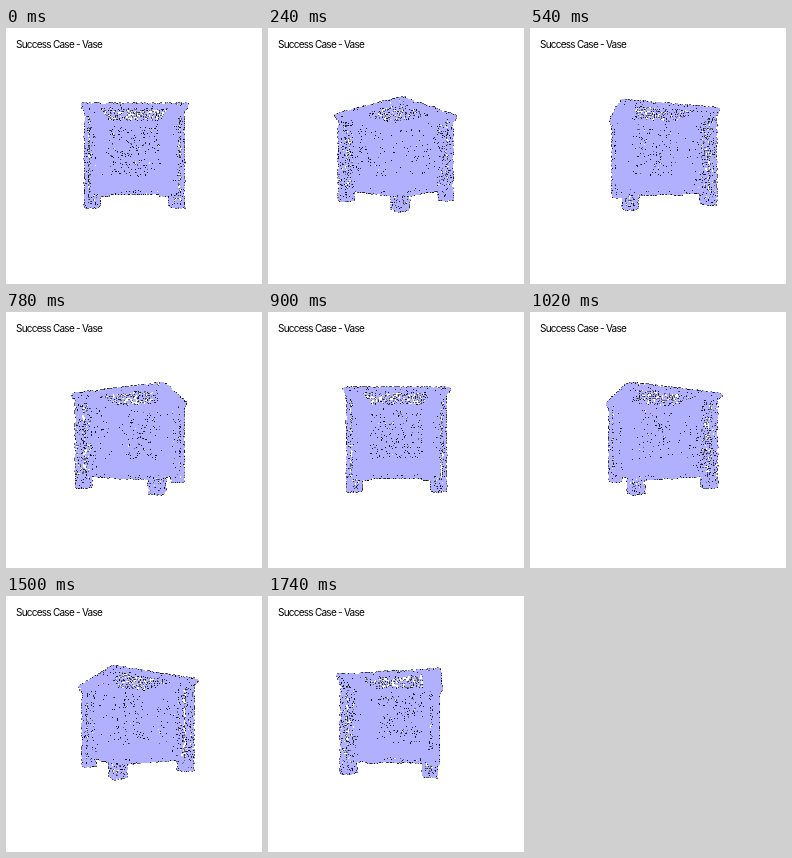
These frames come from a looping animation (256x256 px, 1800 ms). An HTML page with a canvas:

```html
<!DOCTYPE html>
<html lang="en">
<head>
<meta charset="utf-8">
<title>Rotating point cloud</title>
<style>
  html, body { margin: 0; width: 100%; height: 100%; overflow: hidden; background: #fff; }
  canvas { position: absolute; left: 0; top: 0; }
  p {
    position: absolute; left: 10px; top: 10px; margin: 0; white-space: nowrap;
    font: 10px/13px Inter, sans-serif; letter-spacing: -0.75px; color: #000;
  }
</style>
</head>
<body>
<canvas id="stage" width="256" height="256"></canvas>
<p>Success Case - Vase</p>
<script>
const ctx = document.getElementById('stage').getContext('2d');
const STEP = 60, STEPS = 30;
const CENTER = 128, HORIZON = 136, DISTANCE = 222;
const points = [];

let seed = 7;
function random() {
  seed = (seed * 1664525 + 1013904223) >>> 0;
  return seed / 4294967296;
}
const between = (a, b) => a + (b - a) * random();

// Samples one side of the planter and repeats it on all four sides.
function scatter(count, sample) {
  for (let side = 0; side < 4; side++) {
    for (let i = 0; i < count; i++) {
      let [x, y, z] = sample();
      for (let k = 0; k < side; k++) [x, z] = [z, -x];
      points.push([x, y, z]);
    }
  }
}
const box = (count, x0, x1, y0, y1, z0, z1) =>
  scatter(count, () => [between(x0, x1), between(y0, y1), between(z0, z1)]);

box(1250, -30, 30, -43, 24.5, 38, 38);   // outer wall
box(1150, -30, 30, -49, 13, 30, 30);     // inner wall
box(1000, -30, 30, 12.5, 24.5, -30, 30); // floor slab
box(250, -30, 30, 24, 24.5, 30, 38);     // underside edge
for (const side of [-1, 1]) {
  const a = 30 * side, b = 40.5 * side;
  box(270, a, b, -43, 24.5, 40.5, 40.5); // corner post
  box(50, a, b, 24.5, 35, 40.5, 40.5);   // foot
  box(50, a, b, 24.5, 35, 30, 30);
  box(30, a, b, 35, 35, 30, 40.5);
}
scatter(550, () => {                     // top of the rim
  const z = between(30, 43.5);
  return [z * between(-1, 1), -49, z];
});
scatter(240, () => {                     // flared edge of the rim
  const f = random(), z = 40 + 3.5 * f;
  return [z * between(-1, 1), -43 - 6 * f, z];
});

function draw(step) {
  const angle = step / STEPS * 2 * Math.PI;
  const c = Math.cos(angle), s = Math.sin(angle);
  const dots = points.map(([x, y, z]) => {
    const scale = DISTANCE / (DISTANCE - z * c + x * s);
    return [
      Math.round(CENTER + (x * c + z * s) * scale),
      Math.round(HORIZON + y * scale)
    ];
  });
  ctx.clearRect(0, 0, 256, 256);
  // Shadows of all dots lie below; they show only where the cloud is thin.
  ctx.fillStyle = 'rgba(12, 12, 24, 0.65)';
  dots.forEach(([x, y], i) => ctx.fillRect(x - (i & 1), y - (i >> 1 & 1), 2, 2));
  ctx.fillStyle = '#b0b0ff';
  dots.forEach(([x, y], i) => {
    if (i & 4) ctx.fillRect(x - (i & 1), y, 2, 1);
    else ctx.fillRect(x, y - (i >> 1 & 1), 1, 2);
  });
}

let shown = -1;
function tick() {
  const step = Math.floor(performance.now() / STEP) % STEPS;
  if (step !== shown) draw(shown = step);
  requestAnimationFrame(tick);
}
tick();
</script>
</body>
</html>
```
